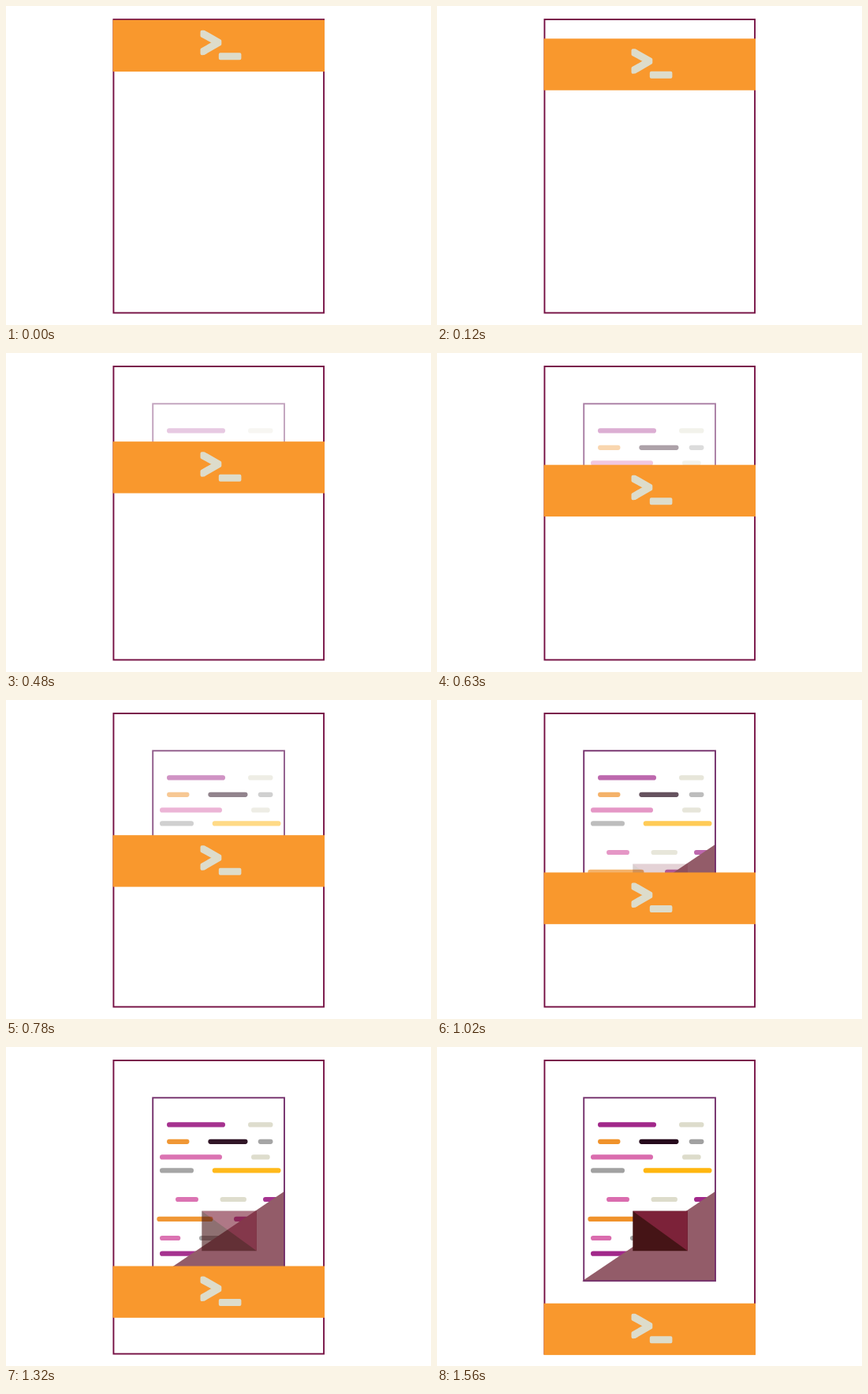
Write an HTML page that moves like this. It is 539 px wide and 404 px high and loops after 1.59 s.

```html
<!DOCTYPE html>
<html lang="en">
<head>
<meta charset="utf-8">
<title>Terminal scan</title>
<style>
  html, body { margin: 0; width: 100%; height: 100%; overflow: hidden; background: #fff; }
  svg { display: block; width: 539px; height: 404px; }
</style>
</head>
<body>
<svg viewBox="0 0 539 404">
  <clipPath id="above"><rect id="mask" width="539"/></clipPath>
  <rect x="136.4" y="17" width="266.7" height="371.6" fill="none" stroke="#750f43" stroke-width="1.9"/>
  <g clip-path="url(#above)">
    <g id="lines" stroke-width="6.2" stroke-linecap="round"/>
    <path d="M353.5 182.5V296.5H184Z" fill="#935c69"/>
    <g id="image">
      <path d="M248.3 207.8H317.8V258.2H248.3Z" fill="#451416"/>
      <path d="M248.3 207.8H317.8V258.2Z" fill="#7c2239"/>
    </g>
    <rect id="page" x="186.2" y="64.3" width="166.8" height="231.9" fill="none" stroke="#74306c" stroke-width="1.9"/>
  </g>
  <g id="bar">
    <rect x="135.5" width="268.5" height="65.4" fill="#f9982d"/>
    <g fill="#dddccb" stroke="#dddccb" stroke-width="4" stroke-linejoin="round">
      <path d="M248.5 15L251 15L271.3 26.5V30.5L251 42.3L248.5 42.5V37.5L264.3 28.5L248.5 20Z"/>
      <path d="M271.8 43.5H296.4V48.5H271.8Z"/>
    </g>
  </g>
</svg>
<script>
const LOOP = 1590, STEP = 30;
const $ = id => document.getElementById(id);
const ramp = (t, from, to) => Math.min(1, Math.max(0, (t - from) / (to - from)));

const purple = '#a1288a', beige = '#dddccb', orange = '#f0922b', ink = '#260a1c',
      grey = '#a1a1a1', pink = '#da6cae', yellow = '#ffb60f';

// Each row: y, then [left, right, colour] for its dashes
const rows = [
  [98.4, [204, 278, purple], [307, 338.5, beige]],
  [119.8, [204, 232.5, orange], [256.3, 306.5, ink], [319.7, 338.5, grey]],
  [139.4, [195, 274, pink], [311, 334.7, beige]],
  [156.4, [195, 238, grey], [261.7, 348.5, yellow]],
  [193, [215, 244, pink], [271.5, 305, beige], [326, 350, purple]],
  [217.9, [191.3, 262.5, orange], [289, 318, purple]],
  [242, [195, 221.3, pink], [245, 275, grey]],
  [261.7, [195, 250, purple]]
];
$('lines').innerHTML = rows.map(([y, ...dashes]) => dashes.map(([a, b, color]) =>
  `<path d="M${a + 3.1} ${y}H${b - 3.1}" stroke="${color}"/>`).join('')).join('');

function draw(now) {
  const t = Math.floor(now % LOOP / STEP) * STEP;
  const y = 17.7 + 307 * t / (LOOP - STEP);
  $('bar').setAttribute('transform', `translate(0 ${y})`);
  $('mask').setAttribute('height', y + 10);
  $('page').setAttribute('opacity', ramp(t, 90, 960));
  $('lines').setAttribute('opacity', ramp(t, 180, 1380));
  $('image').setAttribute('opacity', ramp(t, 780, 1560) ** 1.35);
}

let start;
function tick(now) {
  start ??= now;
  draw(now - start);
  requestAnimationFrame(tick);
}
draw(0);
requestAnimationFrame(tick);
</script>
</body>
</html>
```
